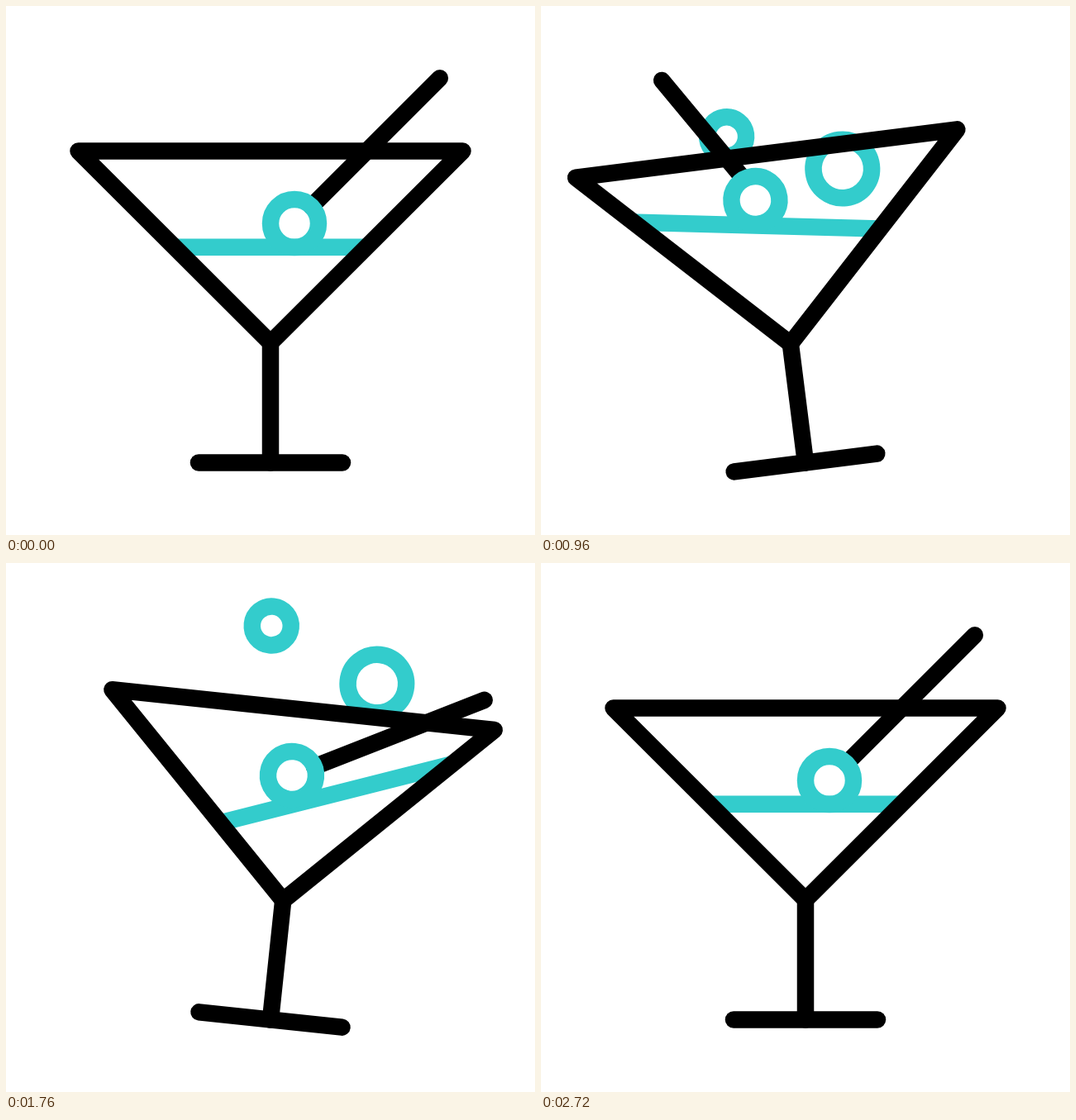
Animation, 640 px wide and 640 px high, one loop 2.8 s. Source, as an HTML page with a canvas:

```html
<!DOCTYPE html>
<html lang="en">
<head>
<meta charset="utf-8">
<title>Swaying cocktail</title>
<style>
  html, body { margin: 0; width: 100%; height: 100%; overflow: hidden; background: #fff; }
  canvas { display: block; width: 100vmin; height: 100vmin; }
</style>
</head>
<body>
<canvas id="stage" width="640" height="640"></canvas>
<script>
const ctx = document.getElementById('stage').getContext('2d');
const LOOP = 2800, STEP = 40, LINE = 20.5;
const BLACK = '#000', TEAL = '#33cccc';
const PIVOT = { x: 320, y: 552.5 };
const RIM = [[87.5, 175.5], [552.5, 175.5], [320, 407.5]];

// Each swing runs between two times and rests outside them.
const GLASS_SWINGS = [[84, 846], [955, 1595], [1706, 2506]];
const STRAW_SWINGS = [[84, 846], [955, 1595], [1750, 2700]];

const rad = deg => deg * Math.PI / 180;
const clamp = v => Math.min(1, Math.max(0, v));
const ramp = (t, from, to) => clamp((t - from) / (to - from));

// cubic-bezier(2/3, 0, 1/3, 1)
function ease(x) {
  if (x <= 0 || x >= 1) return clamp(x);
  let lo = 0, hi = 1;
  for (let i = 0; i < 24; i++) {
    const s = (lo + hi) / 2;
    if (2 * s - 3 * s * s + 2 * s ** 3 < x) lo = s; else hi = s;
  }
  return lo * lo * (3 - 2 * lo);
}

// Goes through rest, left, right and rest again; bends bow the path of each swing.
function track(t, swings, [rest, left, right], bends = [0, 0, 0]) {
  const stops = [rest, left, right, rest];
  let i = 0;
  while (i < 2 && t >= swings[i + 1][0]) i++;
  const p = ease(ramp(t, ...swings[i]));
  return stops[i] + (stops[i + 1] - stops[i]) * p + 4 * p * (1 - p) * bends[i];
}

function stroke(color, points, closed) {
  ctx.strokeStyle = color;
  ctx.beginPath();
  points.forEach(([x, y]) => ctx.lineTo(x, y));
  if (closed) ctx.closePath();
  ctx.stroke();
}

function ring(x, y, radius, scale = 1) {
  if (scale <= 0) return;
  ctx.save();
  ctx.translate(x, y);
  ctx.scale(scale, scale);
  ctx.strokeStyle = TEAL;
  ctx.beginPath();
  ctx.arc(0, 0, radius, 0, 2 * Math.PI);
  ctx.stroke();
  ctx.restore();
}

function drawBubbles(t) {
  const scale = ease(ramp(t, 520, 860)) * (1 - ease(ramp(t, 1770, 2090)));
  const s = t - 960;
  ring(274.8 - 0.0045 * s, 149 - 0.0783 * s - 1.23e-5 * s * s, 23.5, scale);
  ring(409 - 0.0044 * s, 205.4 - 0.0499 * s - 4.8e-5 * s * s, 35.3, scale);
}

function drawLiquid(t) {
  const y = track(t, GLASS_SWINGS, [291.7, 263.9, 290.6], [0, -10, -4]);
  const slope = Math.tan(rad(track(t, GLASS_SWINGS, [0, 8.7, -20.3])));
  ctx.save();
  ctx.beginPath();
  RIM.forEach(p => ctx.lineTo(...p));
  ctx.clip();
  stroke(TEAL, [[20, y - 300 * slope], [620, y + 300 * slope]]);
  ctx.restore();
}

function drawStraw(t) {
  const follow = (stops, bends) => track(t, STRAW_SWINGS, stops, bends);
  const x = follow([349, 299.7, 314.8], [-9.5, -0.5, 0]);
  const y = follow([263, 229.9, 255.9], [-11.5, -9.4, -2.5]);
  const angle = rad(follow([45, -30.8, 62.6], [-3.8, -0.5, 0]));
  const length = follow([248.7, 184, 250], [-20, -26, 0]);
  const shift = follow([0, 5.5, 0], [-5, -6, 0]);
  const dx = Math.sin(angle), dy = -Math.cos(angle);
  const foot = [x + 29 * dx - shift * dy * 0.85, y + 29 * dy + shift * dx * 0.85];
  stroke(BLACK, [foot, [x + length * dx, y + length * dy]]);
  ring(x, y, 29);
}

function drawGlass() {
  stroke(BLACK, RIM, true);
  stroke(BLACK, [RIM[2], [PIVOT.x, PIVOT.y]]);
  stroke(BLACK, [[233, PIVOT.y], [407, PIVOT.y]]);
}

function draw(t) {
  ctx.fillStyle = '#fff';
  ctx.fillRect(0, 0, 640, 640);
  ctx.save();
  ctx.lineWidth = LINE;
  ctx.lineCap = ctx.lineJoin = 'round';
  ctx.translate(PIVOT.x, PIVOT.y);
  ctx.rotate(rad(track(t, GLASS_SWINGS, [0, -7.2, 6.05])));
  ctx.translate(-PIVOT.x, -PIVOT.y);
  drawBubbles(t);
  drawLiquid(t);
  drawStraw(t);
  drawGlass();
  ctx.restore();
}

const start = performance.now();
function tick() {
  const t = (performance.now() - start) % LOOP;
  draw(Math.floor(t / STEP) * STEP);
  requestAnimationFrame(tick);
}
tick();
</script>
</body>
</html>
```
